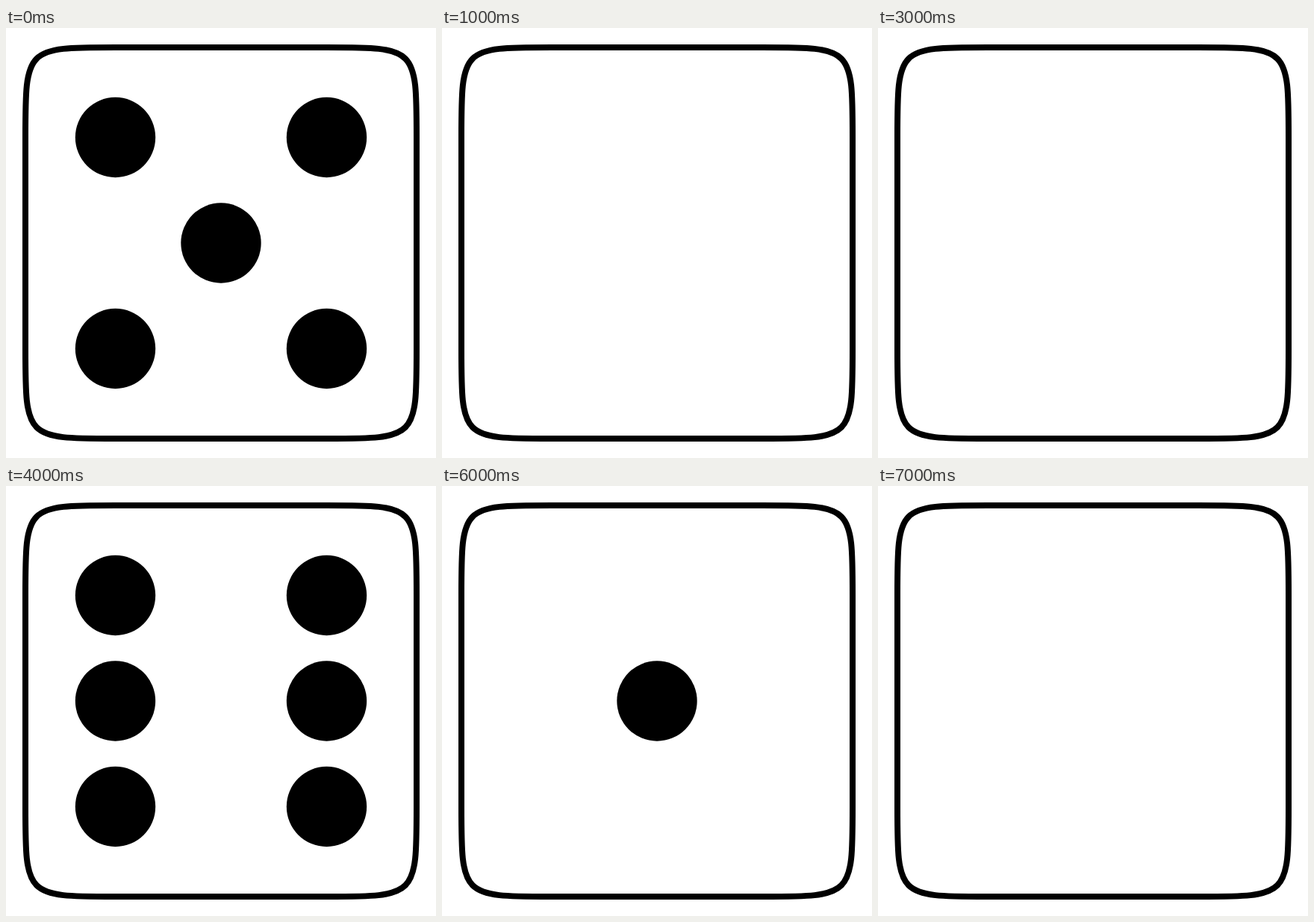
These frames come from a looping animation (576 px wide and 576 px high, 8000 ms). An HTML page:

```html
<!DOCTYPE html>
<html lang="en">
<head>
<meta charset="utf-8">
<title>Rolling die</title>
<style>
  html, body { margin: 0; width: 100%; height: 100%; overflow: hidden; background: #fff; }
  svg { display: block; width: 576px; height: 576px; }
  .face { fill: none; stroke: #000; stroke-width: 8; }
  .pips { visibility: hidden; animation: 8s step-end infinite; }
  .five { animation-name: five; }
  .six { animation-name: six; }
  .one { animation-name: one; }
  @keyframes five {
    0% { visibility: visible; }
    12.5%, 100% { visibility: hidden; }
  }
  @keyframes six {
    0%, 37.5%, 62.5%, 100% { visibility: hidden; }
    25%, 50% { visibility: visible; }
  }
  @keyframes one {
    0%, 87.5%, 100% { visibility: hidden; }
    75% { visibility: visible; }
  }
</style>
</head>
<body>
<svg viewBox="0 0 576 576">
  <defs>
    <circle id="pip" r="53.7"/>
    <g id="corners">
      <use href="#pip" x="146.5" y="146.5"/>
      <use href="#pip" x="429.5" y="146.5"/>
      <use href="#pip" x="146.5" y="429.5"/>
      <use href="#pip" x="429.5" y="429.5"/>
    </g>
  </defs>
  <path class="face" d="M146.5 26H429.5C550 26 550 26 550 146.5V429.5C550 550 550 550 429.5 550H146.5C26 550 26 550 26 429.5V146.5C26 26 26 26 146.5 26Z"/>
  <g class="pips five">
    <use href="#corners"/>
    <use href="#pip" x="288" y="288"/>
  </g>
  <g class="pips six">
    <use href="#corners"/>
    <use href="#pip" x="146.5" y="288"/>
    <use href="#pip" x="429.5" y="288"/>
  </g>
  <g class="pips one">
    <use href="#pip" x="288" y="288"/>
  </g>
</svg>
</body>
</html>
```
